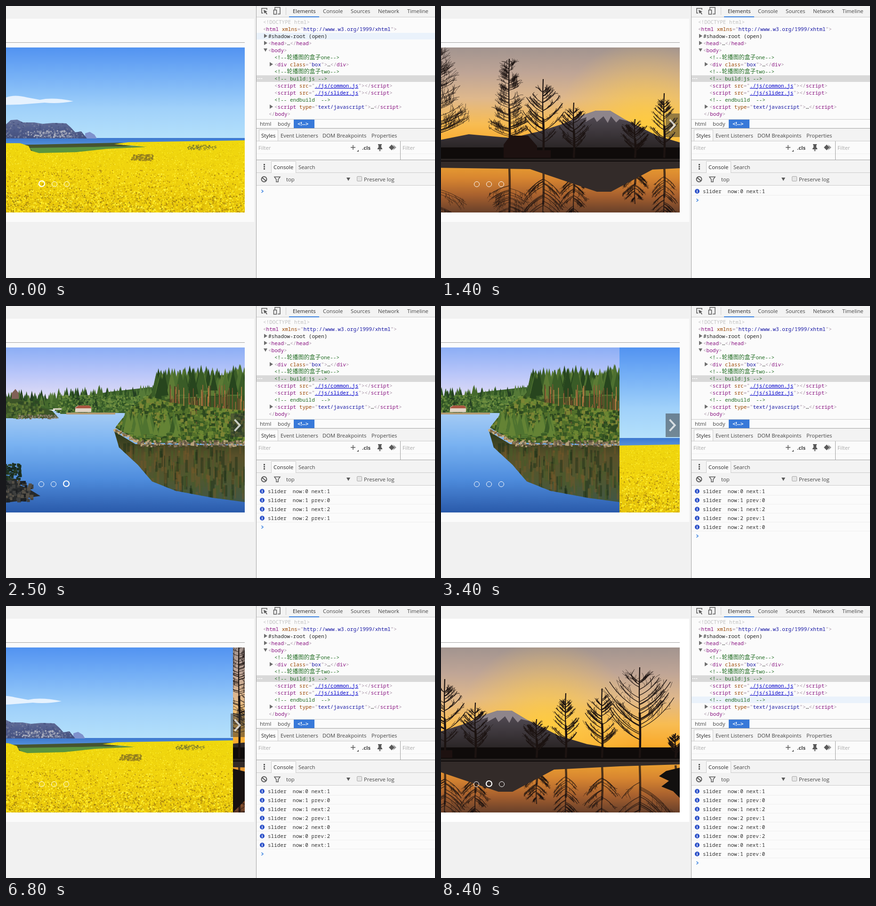
Write an HTML page with a canvas that moves like this. It is 911 px wide and 577 px high and loops after 9.4 s.

```html
<!DOCTYPE html>
<html lang="en">
<head>
<meta charset="utf-8">
<title>Slider</title>
<style>
html, body { margin: 0; width: 100%; height: 100%; overflow: hidden; background: #f1f1f1; }
#stage { position: relative; width: 911px; height: 577px; overflow: hidden; }
#panel { position: absolute; top: 27px; width: 527px; height: 431px; background: #fbfbfb; }
#view { position: absolute; top: 88px; width: 507px; height: 350px; overflow: hidden; }
#view canvas { position: absolute; top: 0; left: -293px; }
svg { position: absolute; top: 0; left: 0; }
text { font: 11.3px "Open Sans", "Noto Sans", sans-serif; fill: #444; white-space: pre; }
.mono text { font: 11px "Noto Sans Mono", "DejaVu Sans Mono", monospace; fill: #a894a6; }
.mono .zh { font: 12px "Noto Sans CJK SC", "Noto Sans CJK", sans-serif; }
.mono .log { fill: #303030; }
.mono .dim { fill: #c0c0c0; }
.mono .dark { fill: #222; }
.mono .c { fill: #236e25; }
.t { fill: #881280; }
.n { fill: #994500; }
.v { fill: #1a1aa6; }
.u { fill: #0000cc; text-decoration: underline; }
.grey { fill: #a9a9a9; }
.bold { font-weight: 700; }
.line { fill: none; stroke: #ccc; }
.edge { fill: none; stroke: #a3a3a3; }
.bar { fill: #f3f3f3; }
.ink { fill: none; stroke: #5a5a5a; stroke-width: 1.5; }
.fill { fill: #5a5a5a; }
.tri { fill: #6e6e6e; }
.prompt { fill: none; stroke: #3b82e0; stroke-width: 1.6; }
</style>
</head>
<body>
<div id="stage">
<div id="panel"></div>
<div id="view"></div>
<svg width="911" height="577">
  <path class="edge" d="M0 77.5H507"/>
  <g id="dots" fill="none" stroke="#fff"></g>
  <g id="arrow">
    <rect x="477" y="228" width="30" height="50" fill="#333" opacity=".5"/>
    <path d="M485.500 241l11 12-11 12" fill="none" stroke="#fff" stroke-width="4" opacity=".72"/>
  </g>

  <rect x="531" width="380" height="577" fill="#fbfbfb"/>
  <rect class="bar" x="532" width="379" height="23"/>
  <path class="line" d="M532 23.500H911M594.500 3V19"/>
  <rect x="601" y="22" width="64" height="2" fill="#3b82e0"/>
  <path class="ink" d="M546 15H543V5H554V8"/>
  <path class="fill" d="M547 8l8 4-3 1 3 4-1.500 1-3-4-2 2z"/>
  <path class="ink" d="M571 8V3H582V17H577M568.500 8.500h6v9h-6z"/>
  <text x="609" y="15" style="fill:#222">Elements</text>
  <text x="673" y="15">Console</text>
  <text x="732" y="15">Sources</text>
  <text x="790" y="15">Network</text>
  <text x="852" y="15">Timeline</text>

  <rect id="hover" x="532" width="379" height="14" fill="#eaf2fb"/>
  <rect x="532" y="147" width="379" height="14" fill="#d9d9d9"/>
  <path d="M534 154H545" stroke="#fff" stroke-width="2" stroke-dasharray="2 2"/>
  <path class="tri" d="M548 59l7 4.500-7 4.500zM548 74l7 4.500-7 4.500zM547 90h8l-4 7zM560 119l7 4.500-7 4.500zM560 209l7 4.500-7 4.500z"/>
  <g class="mono">
    <text class="dim" x="546" y="38">&lt;!DOCTYPE html&gt;</text>
    <text x="546" y="53">&lt;<tspan class="t">html</tspan> <tspan class="n">xmlns</tspan>="<tspan class="v">http://www.w3.org/1999/xhtml</tspan>"&gt;</text>
    <text class="dark" x="557" y="68">#shadow-root (open)</text>
    <text x="557" y="83">&lt;<tspan class="t">head</tspan>&gt;<tspan class="dark">…</tspan>&lt;/<tspan class="t">head</tspan>&gt;</text>
    <text x="557" y="98">&lt;<tspan class="t">body</tspan>&gt;</text>
    <text class="c" x="570" y="113">&lt;!--<tspan class="zh">轮播图的盒子</tspan>one--&gt;</text>
    <text x="570" y="128">&lt;<tspan class="t">div</tspan> <tspan class="n">class</tspan>="<tspan class="v">box</tspan>"&gt;<tspan class="dark">…</tspan>&lt;/<tspan class="t">div</tspan>&gt;</text>
    <text class="c" x="570" y="143">&lt;!--<tspan class="zh">轮播图的盒子</tspan>two--&gt;</text>
    <text class="c" x="570" y="158">&lt;!-- build:js --&gt;</text>
    <text x="570" y="173">&lt;<tspan class="t">script</tspan> <tspan class="n">src</tspan>="<tspan class="u">./js/common.js</tspan>"&gt;&lt;/<tspan class="t">script</tspan>&gt;</text>
    <text x="570" y="188">&lt;<tspan class="t">script</tspan> <tspan class="n">src</tspan>="<tspan class="u">./js/slider.js</tspan>"&gt;&lt;/<tspan class="t">script</tspan>&gt;</text>
    <text class="c" x="570" y="203">&lt;!-- endbuild  --&gt;</text>
    <text x="570" y="218">&lt;<tspan class="t">script</tspan> <tspan class="n">type</tspan>="<tspan class="v">text/javascript</tspan>"&gt;<tspan class="dark">…</tspan>&lt;/<tspan class="t">script</tspan>&gt;</text>
    <text x="558" y="233">&lt;/<tspan class="t">body</tspan>&gt;</text>
  </g>

  <path class="line" d="M532 240.500H911"/>
  <rect x="611" y="241" width="44" height="18" fill="#3879d9"/>
  <text x="539" y="254">html</text>
  <text x="577" y="254">body</text>
  <text class="bold" x="619" y="254" style="fill:#fff">&lt;!--&gt;</text>

  <rect class="bar" x="532" y="260" width="379" height="26"/>
  <rect class="line" x="537.500" y="262.500" width="40" height="24" style="fill:#fbfbfb"/>
  <path class="edge" d="M532 259.500H911"/>
  <path class="line" d="M532 286.500H537M578 286.500H911"/>
  <text x="542" y="279" style="fill:#222">Styles</text>
  <text x="583" y="279">Event Listeners</text>
  <text x="672" y="279">DOM Breakpoints</text>
  <text x="776" y="279">Properties</text>

  <text class="grey" x="536" y="305">Filter</text>
  <text class="grey" x="842" y="305">Filter</text>
  <path class="ink" d="M732 300H742M737 295V305"/>
  <path class="fill" d="M749 305v4h-4zM790 293h8v2h-1v5l2 2v2h-4v4h-2v-4h-4v-2l2-2v-5h-1zM813 300l6-6 6 6-6 6z"/>
  <path d="M822 294l7 6-7 6 2-6z" fill="#999"/>
  <text class="bold" x="756" y="305">.cls</text>
  <path d="M532 313.500H911" stroke="#eee"/>
  <path class="edge" d="M837.500 287V326M532 326.500H911"/>

  <rect class="bar" x="532" y="327" width="379" height="26"/>
  <path class="line" d="M532 353.500H911"/>
  <path class="line" d="M563.500 354V329.500H615.500V354" style="fill:#fbfbfb"/>
  <path class="fill" d="M547 335h3v3h-3zM547 339.500h3v3h-3zM547 344h3v3h-3z"/>
  <text x="568" y="346" style="fill:#222">Console</text>
  <text x="621" y="346">Search</text>
  <rect class="bar" x="532" y="354" width="379" height="26"/>
  <path class="line" d="M532 380.500H911"/>
  <g class="ink"><circle cx="548" cy="367.500" r="5.500" stroke-width="2"/><path d="M544 364l8 7" stroke-width="2"/><path d="M570 362.500H582L578 368V373H574V368z"/></g>
  <path class="fill" d="M723 364h8l-4 7z"/>
  <rect x="745.500" y="361.500" width="10" height="10" rx="1.500" fill="#e6e6e6" stroke="#aaa"/>
  <text x="595" y="372">top</text>
  <text x="760" y="372">Preserve log</text>
  <g id="logs" class="mono"></g>
  <path id="prompt" class="prompt" d="M542.500 390l3.500 3-3.500 3"/>
  <path class="edge" d="M531.500 0V577"/>
</svg>
</div>
<script>
const WIDTH = 800, LEFT = -293, LOOP = 9400, SLIDE_MS = 667;
const $ = id => document.getElementById(id);

// --- Scenes, drawn in stage coordinates ---
let seed = 7;
const rnd = (a = 1, b = 0) => {
  seed = (seed * 16807) % 2147483647;
  return b + (a - b) * seed / 2147483647;
};
const pick = list => list[Math.floor(rnd(list.length))];

function scene(draw) {
  const canvas = document.createElement('canvas');
  canvas.width = WIDTH;
  canvas.height = 350;
  const c = canvas.getContext('2d');
  c.translate(-LEFT, -88);
  draw(c);
  $('view').append(canvas);
  return canvas;
}
function shade(c, y0, y1, ...colors) {
  const g = c.createLinearGradient(0, y0, 0, y1);
  colors.forEach((col, i) => g.addColorStop(i / (colors.length - 1), col));
  return g;
}
function band(c, y0, y1, ...colors) {
  c.fillStyle = colors[1] ? shade(c, y0, y1, ...colors) : colors[0];
  c.fillRect(LEFT, y0, WIDTH, y1 - y0);
}
function shape(c, d, fill) {
  c.fillStyle = fill;
  c.fill(new Path2D(d));
}
function specks(c, n, x0, y0, x1, y1, size, colors) {
  for (let i = 0; i < n; i++) {
    c.fillStyle = pick(colors);
    const s = rnd(size, size / 2);
    c.fillRect(rnd(x1, x0), rnd(y1, y0), s, s);
  }
}
function clipped(c, d, paint) {
  c.save();
  c.clip(new Path2D(d));
  paint();
  c.restore();
}

function field(c) {
  band(c, 88, 282, '#5293f1', '#78b2f6', '#a0d1fa', '#b5e1fb');
  shape(c, 'M-90 207Q-40 190 0 194Q18 187 45 194L72 199Q100 193 143 202Q110 208 82 205L30 209L-50 211z', 'rgba(245,250,255,.85)');
  band(c, 280, 300, '#3d78cf', '#5a97dc');
  shape(c, 'M168 281V270L178 267L188 273L193 281z', '#7f92cd');
  const island = 'M-90 281L-50 260L0 251L10 242L24 241L36 247L60 247L78 250L100 248L128 249L138 258L147 268L160 266L172 281z';
  shape(c, island, shade(c, 240, 282, '#66719b', '#505d8c', '#444f7c'));
  clipped(c, island, () => {
    specks(c, 450, -90, 245, 172, 282, 4, ['#4a5683', '#5d688f', '#717a9c']);
    specks(c, 80, 45, 263, 140, 277, 4, ['#a9adbd', '#8088a4']);
  });
  band(c, 297, 330, '#5e9144');
  shape(c, 'M-293 297L60 294L240 290L300 292L250 298L50 301L60 312L-293 312z', '#47542f');
  shape(c, 'M50 303L140 300L235 298L235 309L70 312z', '#5c953e');
  const bloom = 'M-293 296L0 291L30 291L48 297L53 307L70 312L150 310L215 303L300 299L230 293L260 289L507 285V438H-293z';
  shape(c, bloom, shade(c, 285, 438, '#efd80e', '#f0d20d', '#e6c30b'));
  clipped(c, bloom, () => {
    for (let i = 0; i < 22; i++) {
      const y = 290 + i * 7;
      specks(c, 430, LEFT, y, 507, y + 8, 1.5 + i * .11, ['#ffe81c', '#fff13c', '#f7de12', '#d9b70a', i < 8 ? '#e3c70e' : '#b48f10']);
    }
    specks(c, 90, 265, 314, 310, 326, 4, ['#a98f1a', '#8f7d20']);
    specks(c, 90, 385, 294, 445, 304, 3, ['#a49a22', '#7c7b2b']);
    specks(c, 500, LEFT, 400, 507, 438, 2.5, ['#8f7717', '#a9890e']);
  });
}

function bareTree(c, x, top, spread, conical) {
  const base = 322, h = base - top;
  c.strokeStyle = '#1c1311';
  const stroke = (w, ...p) => {
    c.lineWidth = w;
    c.beginPath();
    c.moveTo(p[0], p[1]);
    c.quadraticCurveTo(p[2], p[3], p[4], p[5]);
    c.stroke();
  };
  stroke(4.5, x, base, x + 2, base - h * .25, x, base - h * .5);
  stroke(2.2, x, base - h * .45, x - 2, base - h * .7, x, top);
  const count = conical ? 90 : 34;
  for (let i = 0; i < count; i++) {
    const u = rnd(1, .2), side = i % 2 ? 1 : -1;
    const reach = spread * (conical ? 1.15 - u : Math.sin(Math.PI * Math.min(1, u * .75 + .18))) * rnd(1, .55);
    const y = base - h * u * (conical ? 1 : .85);
    const rise = conical ? reach * .45 : Math.min(reach * .9, y - top);
    stroke(conical ? .9 : 1.3, x, y, x + side * reach * .6, y - rise * .3, x + side * reach, y - rise);
    for (let j = 0; j < 6; j++) {
      const k = rnd(1, .3), bx = x + side * reach * k, by = y - rise * k * .8;
      stroke(.6, bx, by, bx + side * 3, by - 5, bx + side * rnd(15, -5) * spread / 60, by - rnd(16, 4) * spread / 60);
    }
  }
}

function sunset(c) {
  band(c, 88, 305, '#a2948f', '#bfa596', '#dfb88c', '#f8bc52', '#f9a522');
  const glow = c.createRadialGradient(225, 262, 5, 225, 262, 190);
  glow.addColorStop(0, 'rgba(255,205,60,.9)');
  glow.addColorStop(1, 'rgba(255,200,80,0)');
  c.fillStyle = glow;
  c.fillRect(LEFT, 88, WIDTH, 220);
  shape(c, 'M-293 292L-210 284L-150 272L-60 280L0 266L50 250L90 232L120 222L150 222L180 240L250 275L310 293L370 303L507 307V330H-293z', shade(c, 222, 310, '#57505a', '#3e383d', '#252020'));
  shape(c, 'M90 232L120 222L150 222L187 244L170 240L163 247L152 234L145 248L136 234L122 246L116 236L98 246L100 236L78 243z', '#8e858b');
  band(c, 300, 332, '#0f0b0a');
  band(c, 324, 328, '#292321');
  band(c, 330, 438, '#eda331', '#d78530', '#a7602e', '#68402a');
  c.save();
  c.translate(0, 330);
  c.scale(1, -1);
  c.translate(0, -330);
  bareGroup(c, .75);
  c.restore();
  shape(c, 'M-293 330H507V336L380 340L240 347L152 394L122 394L-20 346L-293 342z', '#332b29');
  bareGroup(c, 1);
  shape(c, 'M-76 322V294L-62 275H-24L-5 297V322zM-5 306H24V322H-5z', '#1d1110');
  shape(c, 'M507 343L478 350L463 361L484 371L468 383L493 393L507 407z', '#12100f');
  shape(c, 'M-293 345L-240 358L-225 380L-265 410L-293 438z', '#171110');
}
function bareGroup(c, alpha) {
  c.globalAlpha = alpha;
  [[-280, 60, 65, 1], [-222, 80, 80, 1], [-64, 112, 48, 1], [8, 155, 46], [73, 205, 32],
   [203, 240, 30], [265, 185, 30], [342, 175, 38], [422, 130, 78], [498, 270, 18]].forEach(p => bareTree(c, ...p));
  c.globalAlpha = 1;
}

function pines(c, n, x0, x1, baseY, height, colors) {
  for (let i = 0; i < n; i++) {
    const x = rnd(x1, x0), y = baseY(x) + rnd(8, -8), h = rnd(height, height * .55), w = h * .22;
    shape(c, `M${x} ${y - h}L${x + w} ${y}L${x - w} ${y}z`, pick(colors));
  }
}
function lake(c) {
  band(c, 88, 200, '#8caef5', '#b9c6f9', '#e5dff5');
  band(c, 222, 438, '#a8cdf5', '#79b2f1', '#4f8ddd', '#2a5aaa');
  const far = ['#2f5424', '#45692d', '#567a38', '#243f22'];
  shape(c, 'M-293 190L120 198L220 182L310 172V228L180 226L110 220L-293 220z', '#3b5f2b');
  pines(c, 320, LEFT, 120, () => 210, 27, far);
  pines(c, 170, 110, 320, x => 222 - (x - 110) * .03, 45, far);
  specks(c, 650, 110, 188, 310, 223, 5, ['#527936', '#6e8d3f', '#365a28']);
  shape(c, 'M-293 196L20 194L60 212L98 222L112 238L-293 238z', '#3c5428');
  specks(c, 400, LEFT, 200, 75, 234, 7, ['#2e4725', '#4e6b30', '#657c35']);
  specks(c, 130, 25, 230, 110, 238, 3, ['#99917b', '#685f4d']);
  shape(c, 'M12 197V185L20 176L27 185V197z', '#806157');
  shape(c, 'M100 217H118V220H100z', '#d9d2c4');
  shape(c, 'M147 215L153 211H176L181 215V225H147z', '#e1d4c4');
  shape(c, 'M146 217L154 211H177L182 217z', '#a85742');
  shape(c, 'M128 226H232V230H128z', '#b39b72');

  // Wooded headland with its mirror image
  const mirror = 'M230 266L275 293L507 296V416L440 407L360 392L310 372L280 337L240 300z';
  shape(c, mirror, shade(c, 270, 416, '#2c3a1c', '#59502a', '#4f5730', '#415645'));
  clipped(c, mirror, () => {
    for (let i = 0; i < 260; i++) {
      c.fillStyle = pick(['rgba(30,48,24,.5)', 'rgba(120,88,40,.4)', 'rgba(72,92,40,.45)']);
      c.fillRect(rnd(507, 235), rnd(395, 290), rnd(7, 2), rnd(40, 10));
    }
  });
  shape(c, 'M232 258L262 225L300 195L330 160L380 153L430 148L507 145V293L285 290z', '#3a5524');
  pines(c, 200, 315, 515, x => 192 - (x - 315) * .05, 58, ['#27451e', '#3a5c27', '#4d7030', '#5d7b35']);
  for (let i = 0; i < 95; i++) {
    c.fillStyle = pick(['#a3693a', '#7d5530', '#c4874a', '#4b3c22']);
    c.fillRect(rnd(507, 345), rnd(220, 165), 1.5, rnd(55, 30));
  }
  clipped(c, 'M232 258L262 220L300 190L350 205L507 222V290L285 288z', () => {
    specks(c, 2000, 230, 190, 507, 290, 9, ['#3a5c24', '#526f2a', '#6b8632', '#2d481f', '#7c8434']);
  });
  pines(c, 60, 250, 370, x => 273 - Math.max(0, 280 - x) * .4, 48, ['#3a5b25', '#4f7330', '#648335']);
  specks(c, 230, 285, 284, 507, 296, 5, ['#b8a37c', '#86745a', '#5d5140']);
  for (let x = 228; x < 285; x += 3) specks(c, 3, x, 258 + (x - 228) * .52, x + 4, 264 + (x - 228) * .52, 5, ['#c9ad7d', '#806a48']);

  shape(c, 'M-293 350L0 364L22 367L28 380L45 386L73 403L45 407L34 413L0 417L-293 430z', '#282a2b');
  specks(c, 220, -100, 368, 52, 410, 8, ['#3e3f3e', '#555047', '#1d2022']);
  specks(c, 300, -80, 332, 28, 366, 6, ['#1d3022', '#2c4025', '#172921']);
}
const slides = [field, sunset, lake].map(scene);

// --- Overlay parts ---
const svg = (parent, markup) => $(parent).insertAdjacentHTML('beforeend', markup);
for (let i = 0; i < 3; i++) svg('dots', '<circle/>');
const moves = [
  { from: 0, to: 1, start: 1000, origin: 961, end: 1500 },
  { from: 1, to: 2, start: 1900, origin: 1825, end: 2500 },
  { from: 2, to: 0, start: 3200, origin: 3225, end: 3900 },
  { from: 0, to: 1, start: 6800, origin: 6725, end: 7400 }
];
const logTimes = [1000, 1700, 1900, 2500, 3200, 3900, 6800, 7400];
logTimes.forEach((_, i) => {
  const { from, to } = moves[i >> 1], y = 393 + 19 * i;
  const message = i % 2 ? `now:${to} prev:${from}` : `now:${from} next:${to}`;
  svg('logs', `<g><path d="M532 ${y + 8.5}H911" stroke="#eee"/><circle cx="544" cy="${y}" r="5" fill="#2b50c8"/>
    <path d="M544 ${y - 3}v1.500M544 ${y - 1}v4" stroke="#fff" stroke-width="1.5"/>
    <text class="log" x="556" y="${y + 4}">slider  ${message}</text></g>`);
});
const hovers = { 0: 57, 100: 117, 200: 192 };

// --- Picture at a given time ---
const swing = p => .5 - Math.cos(Math.PI * Math.min(1, Math.max(0, p))) / 2;
const show = (el, on) => { el.style.visibility = on ? 'visible' : 'hidden'; };

function render(time) {
  const t = Math.floor(time % LOOP / 100) * 100;
  const move = moves.filter(m => t >= m.start).pop();
  const moving = move && t < move.end;
  const current = moving ? move.from : move ? move.to : 0;
  const shift = moving ? Math.round(WIDTH * swing((t - move.origin) / SLIDE_MS)) : 0;
  slides.forEach((el, i) => {
    const next = moving && i === move.to;
    show(el, i === current || next);
    el.style.transform = `translateX(${(next ? WIDTH : 0) - shift}px)`;
  });
  [...$('dots').children].forEach((dot, i) => {
    const active = !moving && i === current;
    dot.setAttribute('cx', 76 + 26 * i + (moving ? 0 : Math.sign(i - current)));
    dot.setAttribute('cy', active ? 377 : 378);
    dot.setAttribute('r', active ? 6 : 5.5);
    dot.setAttribute('stroke-width', active ? 2.2 : 1);
  });
  show($('arrow'), t >= 500 && t < 8200);
  $('panel').style.background = t < 8200 ? '#fbfbfb' : '#fff';
  const row = t >= 8400 ? 192 : hovers[t];
  show($('hover'), row);
  $('hover').setAttribute('y', row || 0);
  const count = logTimes.filter(s => t >= s).length;
  [...$('logs').children].forEach((el, i) => show(el, i < count));
  $('prompt').setAttribute('transform', `translate(0 ${19 * count})`);
}
const began = performance.now();
function tick() {
  render(performance.now() - began);
  requestAnimationFrame(tick);
}
tick();
</script>
</body>
</html>
```
